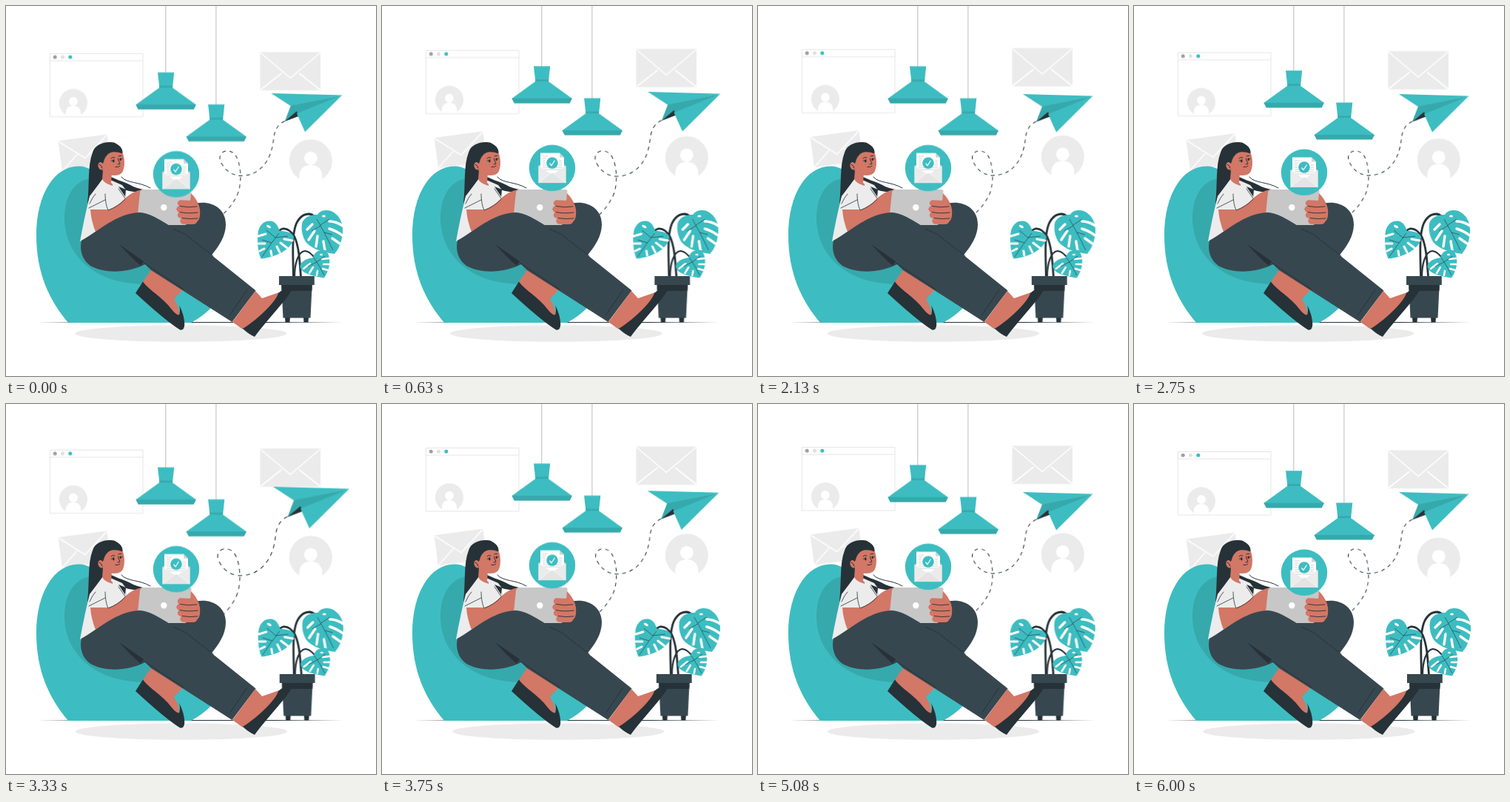
An HTML page for the animation above (6040 ms loop, 500x500 px).

```html
<!DOCTYPE html>
<html lang="en">
<head>
<meta charset="utf-8">
<title>Reading mail</title>
<style>
  html, body { margin: 0; width: 100%; height: 100%; overflow: hidden; background: #fff; }
  svg { display: block; width: 100vw; height: 100vh; }

  .teal { fill: #3dbdc1; }
  .shade { fill: #36a9ad; }
  .pale { fill: #ebebeb; }
  .white { fill: #fff; }
  .slate { fill: #37474f; }
  .ink { fill: #263238; }
  .skin { fill: #d37766; }
  .line { fill: none; stroke: #263238; stroke-width: 1; stroke-linecap: round; stroke-linejoin: round; }
  .fold { fill: none; stroke: #fff; stroke-width: 1.6; }
  .stem { fill: none; stroke: #263238; stroke-width: 2.8; }
  .slot { fill: none; stroke: #fff; stroke-width: 3.4; stroke-linecap: round; }
  .vein { fill: none; stroke: #263238; stroke-width: .6; }

  .drift, .bob, .beat, .shake { animation: float 3020ms linear -40ms infinite; }
  .bob { animation-duration: 1510ms; }
  .beat { animation-name: beat; transform-origin: 328px 198px; }
  .shake { animation-name: shake; animation-duration: 6040ms; }

  @keyframes float { 50% { transform: translateY(-10px); } }
  @keyframes beat {
    0%, 30%, 40%, 60%, 100% { transform: scale(1); }
    10%, 50% { transform: scale(1.1); }
  }
  @keyframes shake {
    0%, 100% { transform: translateX(0); }
    10%, 90% { transform: translateX(-1px); }
    20%, 80% { transform: translateX(2px); }
    30%, 50%, 70% { transform: translateX(-4px); }
    40%, 60% { transform: translateX(4px); }
  }
</style>
</head>
<body>
<svg viewBox="0 0 500 500" xmlns="http://www.w3.org/2000/svg">
  <defs>
    <g id="user">
      <circle class="pale" r="29"/>
      <circle class="white" cy="-3.5" r="9"/>
      <path class="white" d="M-15.5 30V21C-15.5 11-9 5.5 0 5.5S15.5 11 15.5 21V30Z"/>
    </g>
    <g id="lamp">
      <path d="M215.8-60V91" stroke="#c7c7c7" stroke-width="1.2"/>
      <path class="teal" d="M205 90.2H227.2L225 111H207.4Z"/>
      <path class="shade" d="M207.2 108.3H225.2L224.8 111H207.4Z"/>
      <path class="teal" d="M207.4 110.8H224.8L257 134H175.3Z"/>
      <path class="shade" d="M175.3 133.800H257L253.600 140.400H178.800Z"/>
    </g>
  </defs>

  <!-- floating background -->
  <g class="drift">
    <path d="M59.3 64.5H185V150H59.3ZM59.3 74.2H185" fill="#fff" stroke="#e6e6e6"/>
    <circle cx="66.2" cy="69.3" r="2.5" fill="#a0a0a0"/>
    <circle cx="76.5" cy="69.3" r="2.5" fill="#e0e0e0"/>
    <circle class="teal" cx="86.8" cy="69.3" r="2.5"/>
    <use href="#user" transform="translate(91 131.3) scale(.655)"/>
    <path d="M80 150H102" stroke="#e6e6e6"/>
  </g>
  <g class="drift">
    <path class="pale" d="M343.4 62.5H425V114.3H343.4Z"/>
    <path class="fold" d="M344 63.500L384.200 97.500L424.500 63.500M344 113.500L372.500 91M424.500 113.500L396 91"/>
  </g>
  <g class="drift">
    <g transform="translate(70.5 182.5) rotate(-7.6)">
      <path class="pale" d="M0 0H66.5V41.5H0Z"/>
      <path class="fold" d="M.5 .8L33 28L66 .8M.5 41L23 21.5M66 41L43.5 21.5"/>
    </g>
  </g>
  <g class="drift"><use href="#user" x="411.8" y="209.4"/></g>

  <g class="bob"><use href="#lamp"/></g>
  <g class="bob"><use href="#lamp" x="68.1" y="43.2"/></g>

  <ellipse class="pale shake" cx="236.3" cy="442.6" rx="143.3" ry="11.2"/>
  <path class="ink" d="M42 427.5L140 427H360L455 427.5L360 428H140Z"/>

  <!-- paper plane and its trail -->
  <g class="beat">
    <path class="line" stroke-dasharray="5 5" style="stroke-linecap:butt"
      d="M376 156C365 161 362 171 361 181C358 210 342 229 317 229C301 229 289.5 213 289.5 205C290 195 302 193 309 200C318 210 320 240 312 256C307 266 301 273 295 279L270 290"/>
    <path class="teal" d="M358 119L452.5 121.4L384 136Z"/>
    <path class="shade" d="M384 135.5L452.5 121.4L376 156.5Z"/>
    <path class="ink" d="M376 156.5L392 143L394.5 149.5Z"/>
    <path class="teal" d="M452.5 121.4L392 146L403 170.500Z"/>
  </g>

  <!-- potted plant -->
  <g class="shake">
    <path class="stem" d="M388.500 366C388 340 386 310 392 295Q398 281 410 281Q417 282 421 291"/>
    <path class="stem" d="M398.500 366C397 345 396 325 390 312Q383 300 374 301Q369 302 366 309"/>
    <path class="stem" d="M390 366C390 350 394 332 404 331Q412 332 418 342" style="stroke-width:2.2"/>

    <path class="teal" d="M400.5 292C405 284 413 282 421 282C424 275 437 274 443 279C452 285 456 295 455 306C454 320 449 329 444 335C430 333 412 329 404 317C399 307 399 299 400.5 292Z"/>
    <path class="slot" d="M437 291Q446 291 455 297M437 301Q447 304 456 311M441 314L451 321M407 302L414 295M409 316L417 304M419 325L421 311M431 330L429 318"/>
    <path class="white" d="M427 284a2.5 1.5 0 1 0 5 0a2.5 1.5 0 1 0-5 0"/>
    <path class="vein" d="M420 288Q430 305 442 330M425 296L437 288M430 306L441 309M425 297L413 304"/>

    <path class="teal" d="M344.5 341.5C340 331 339 315 341 304C344 293 352 289 360 291C366 293 368 299 370 304C378 304 387 306 389 312C388 326 370 339 344.5 341.5Z"/>
    <path class="slot" d="M341 311L351 308M341 321H350M343 331L349 328M387 317L376 315M380 327L371 320M370 333L366 325M359 337L358 331" style="stroke-width:3"/>
    <path class="white" d="M352 297a3 1.5 30 1 0 6 2a3 1.5 30 1 0-6-2"/>
    <path class="vein" d="M369 307Q358 321 346 339M364 313L352 303M359 320L346 316M364 313L381 311"/>

    <path class="teal" d="M397.5 350C401 343 409 341 415 340C417 331 426 328 432 330C438 336 441 351 430 367.5C415 365 396 361 397.5 350Z"/>
    <path class="slot" d="M437 341L427 342M438 349L429 349M435 357L428 355M402 355L411 348M410 361L415 353M420 364L421 358" style="stroke-width:2.5"/>
    <path class="white" d="M424 336a2 1.3 0 1 0 4 0a2 1.3 0 1 0-4 0"/>
    <path class="vein" d="M416 340Q424 351 430 364M420 346L431 338M420 346L408 352"/>

    <path class="ink" d="M377 420H384L383.5 427.5H377.5ZM402 420H409L408.5 427.5H402.5Z"/>
    <path class="slate" d="M372.5 380H413.5L411.5 421.5H374.5Z"/>
    <path class="ink" d="M372 376H414L413.4 385H372.6Z"/>
    <path class="slate" d="M369 365H416.8V377H369Z"/>
  </g>

  <!-- beanbag -->
  <path class="teal" d="M84 428C58 397 41 360 41 310C41 255 65 216.5 98 216.5C112 216.5 122 224 130 240L150 300L280 360L279 406Q267 419 250 428Z"/>
  <path class="shade" d="M120 233C95 232 79 255 79 287C79 330 112 376 190 376L230 381L200 340L110 300Z"/>

  <!-- hair, neck and shirt -->
  <path class="ink" d="M117 198C120 186 136 182 148 185L140 204L134 226C144 234 160 237 172 244Q184 249 197 249Q181 253 166 250L140 242L130 238C122 250 114 260 110 267C113 240 110 216 117 198Z"/>
  <path class="line" d="M156 231C163 240 180 237 195 246"/>
  <path d="M131 233Q123 244 113 257Q106 285 100 318L122 306L165 285L163 250L157 242L141 235Z" fill="#ececec"/>
  <path class="skin" d="M131 222L143 226L142 239Q145 241 144 243Q133 240 130 234Z"/>
  <path class="ink" d="M152 244L162 248L161 258Z"/>
  <path class="skin" d="M114 275L136 275Q150 270 162 259Q172 250 184 248L205 251L200 285L178 281Q150 285 121 305Q115 290 114 275Z"/>
  <path d="M133 248L152 245L162 259Q151 271 137 276L134 263L113 274L113 257Z" fill="#ececec"/>
  <path class="line" d="M112 273L134 262M134 254Q134 267 138 276Q152 271 161 261M113 267Q117 258 121 254M152 247L161 260" style="stroke-width:.8"/>

  <!-- head -->
  <path class="skin" d="M129 212C128 202 138 195 157 197C161 206 161 218 157 225C152 231 140 230 131 224Z"/>
  <path class="ink" d="M116 209C116 190 130 183 146 185C155 188 159 195 157 199.500C151 197 143 196 138 200C132 205 133 211 130 214L130 226L119 222Z"/>
  <ellipse class="skin" cx="128.3" cy="216.3" rx="3.8" ry="5.3" transform="rotate(-18 128.3 216.3)"/>
  <path class="line" d="M126 214Q129 215 130 219M142 206Q144 203.5 147 205M152 203Q154 201.5 156 202.5M151.5 206Q152 210 154 213L151 214M148 217.5Q152 218.5 154 216"/>
  <ellipse class="ink" cx="145.3" cy="209.5" rx="1.3" ry="1.9"/>
  <ellipse class="ink" cx="154.7" cy="207.5" rx="1.2" ry="1.8"/>
  <path class="line" d="M142 209.5L146 208M154 206L157.5 206.5" style="stroke-width:.8"/>

  <!-- far foot and knee -->
  <path class="skin" d="M197 355L240 382L227 396Q235 408 234 419L213 407L184 374Z"/>
  <path class="ink" d="M185 372.500C193 384 211 393 223 409Q230 418 234 417.500Q236 411 234 404Q241 418 241.300 430Q241 439 235 437.500Q215 425 175 388Z"/>
  <path class="slate" d="M238 275C262 257 297 266 297 295C297 312 287 325 277 338L200 320V285Z"/>

  <!-- tablet -->
  <path d="M185 248H248Q251 248 250.5 251L246 292Q245 296 241 296H200L178 281L181 252Q182 248 185 248Z" fill="#c7c7c7"/>
  <circle class="white" cx="213.3" cy="272.3" r="4.2"/>

  <!-- near leg -->
  <path class="slate" d="M102 317C125 304 150 280 180 279C200 280 216 296 243 309L277 336L337.500 384.500L305.500 427L196 357L188 349C165 361 133 362 114 351C103 343 99 330 102 317Z"/>
  <path class="ink" d="M153 322L186 345L182 351Q169 340 153 322Z"/>
  <path class="line" d="M226 301L243 309L280 338M326 383L303 417M186 347L240 383" style="stroke-width:.9"/>

  <!-- near foot -->
  <path class="skin" d="M337 385L346 395L369 387Q372 398 340 430L320 437L306 427Z"/>
  <path class="ink" d="M320 436C334 428 364 402 368 388Q376 380 387.5 381C381 396 356 420 336 447Q327 443 320 436Z"/>

  <!-- mail bubble -->
  <g class="bob">
    <circle class="teal" cx="230" cy="227.8" r="31.2"/>
    <path d="M211.5 225L230 213L248.5 225V247H211.5Z" fill="#dadada"/>
    <path class="white" d="M214 207.5H240L246 213.5V238H214Z"/>
    <path d="M240 207.5V213.5H246Z" fill="#d5d5d5"/>
    <path d="M217 212H224M217 215H222M217 218H221M217 221H221M217 224H222M217 227H243M217 230H243M239 218H243M239 221H243M238 224H243" stroke="#c7c7c7" stroke-width=".8"/>
    <path class="pale" d="M211.5 225L230 237L248.5 225V248H211.5Z"/>
    <path d="M211.5 248L228 235Q230 233.5 232 235L248.5 248" fill="#e4e4e4" stroke="#fff" stroke-width=".6"/>
    <circle class="teal" cx="230" cy="221" r="7.8"/>
    <path class="fold" d="M226.5 221.5L229 224.5L233.5 217.5" style="stroke-width:1.2"/>
  </g>

  <!-- hand holding the tablet -->
  <path class="skin" d="M250 253Q257 260 260 268Q263 274 262 284Q261 292 252 295H243L242 271L249 263Z"/>
  <path d="M236 266.5L255 267.5M234.5 274.5L256 275.5M236 282.5L256 283.5M239.5 290.5L254 290.5" fill="none" stroke="#d37766" stroke-width="8.4" stroke-linecap="round"/>
  <path class="line" d="M235 270.5Q246 273 258 271M235 278.5Q246 281 259 279M238 286.5Q248 288.5 259 287" style="stroke-width:.9"/>
</svg>
</body>
</html>
```
